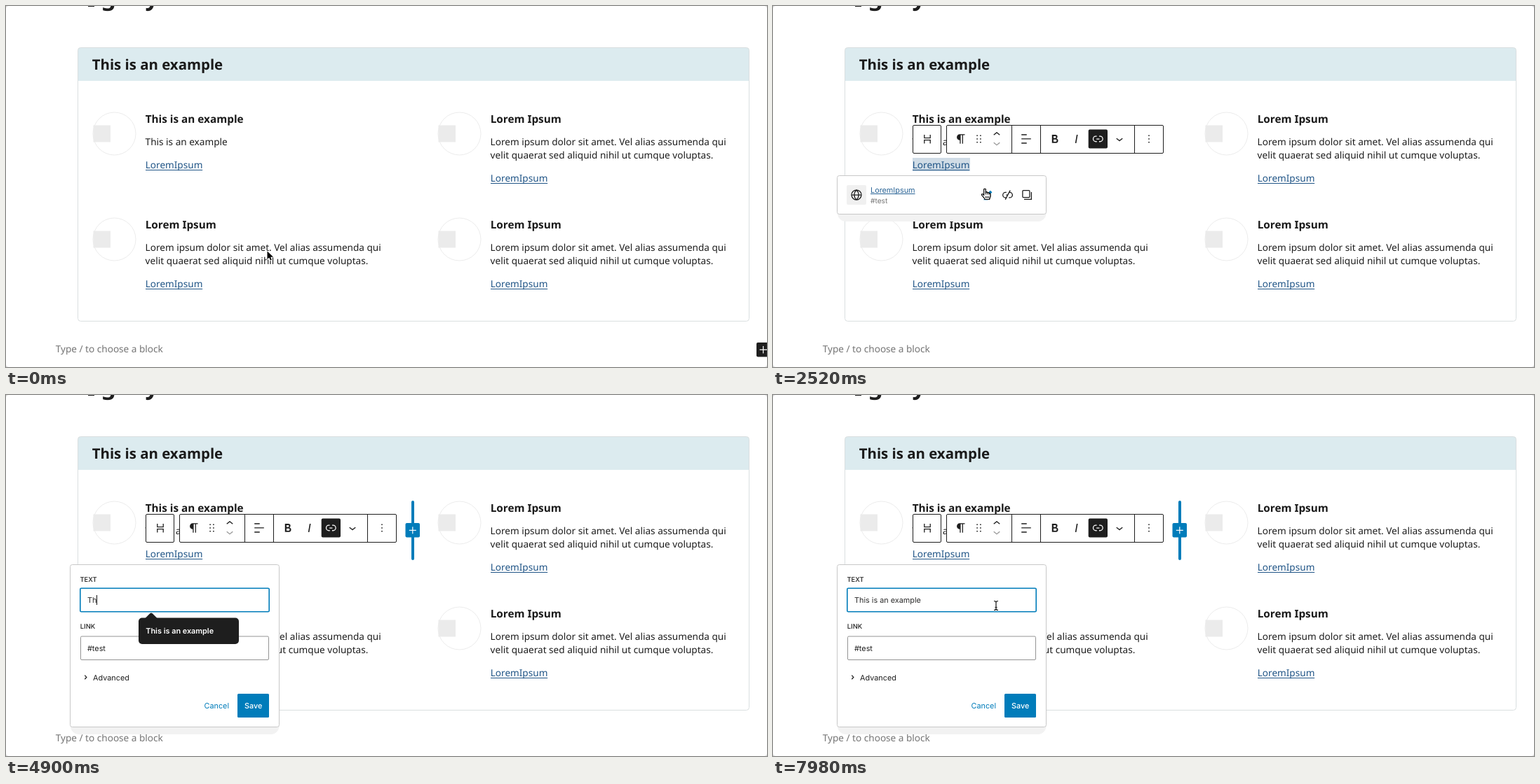
Animation, 1085 px wide and 516 px high, one loop 8 s. Source, as an HTML page with a canvas:

```html
<!DOCTYPE html>
<html lang="en">
<head>
<meta charset="utf-8">
<title>Editing a link</title>
<style>
html, body { margin: 0; width: 100%; height: 100%; overflow: hidden; background: #fff; }
canvas { display: block; }
</style>
</head>
<body>
<canvas id="stage" width="1085" height="516"></canvas>
<script>
const ctx = document.getElementById('stage').getContext('2d');
ctx.textRendering = 'geometricPrecision';
const LOOP = 8000, STEP = 70;
const INK = '#1e1e1e', BLUE = '#007cba', LINK = '#1f5486';
const BODY = '"Noto Sans", sans-serif', UI = 'Inter, sans-serif';
const PHRASE = 'This is an example';
const KEYS = [4620, 4900, 4970, 5180, 5250, 5460, 5530, 5670, 5810,
  5950, 6090, 6510, 6720, 6930, 7000, 7140, 7210, 7350];

// 24-unit icon outlines
const ICON = {
  link: 'M10 17.4H8.44A5.19 5.19 0 1 1 8.44 7H10v1.5H8.44a3.7 3.7 0 0 0 0 7.4H10zM14 7h1.56a5.19 5.19 0 0 1 0 10.4H14v-1.5h1.56a3.7 3.7 0 0 0 0-7.4H14zm-4.5 6h5v-1.5h-5z',
  unlink: 'M17.03 4.7 15.58 4l-1.56 3H14v.03L11.68 11.5H9.5V13h1.4l-1.5 2.89h-.95a3.69 3.69 0 0 1 0-7.39H10V7H8.44a5.19 5.19 0 1 0 0 10.39h.17L7.5 19.53l1.42.72L15.05 8.5h.5a3.69 3.69 0 0 1 0 7.39H14v1.5h1.56a5.19 5.19 0 0 0 .27-10.38z',
  down: 'M17.5 11.6 12 16l-5.5-4.4.9-1.2L12 14l4.5-3.6z',
  up: 'M6.5 12.4 12 8l5.5 4.4-.9 1.2L12 10l-4.5 3.6z',
  more: 'M13 19h-2v-2h2zm0-6h-2v-2h2zm0-6h-2V5h2z',
  drag: 'M8 7h2V5H8zm0 6h2v-2H8zm0 6h2v-2H8zm6-14v2h2V5zm0 8h2v-2h-2zm0 6h2v-2h-2z',
  align: 'M4 19.8h8.9v-1.5H4zM12.9 4.2H4v1.5h8.9zM4 11.2v1.5h16v-1.5z',
  bold: 'M14.7 11.3c1-.6 1.5-1.6 1.5-3 0-2.3-1.3-3.4-4-3.4H7v14h5.8c1.4 0 2.5-.3 3.3-1 .8-.7 1.2-1.7 1.2-2.9.1-1.9-.8-3.1-2.6-3.7zm-5.1-4h2.3c.6 0 1.1.1 1.4.4.3.3.5.7.5 1.2s-.2 1-.5 1.2c-.3.3-.8.4-1.4.4H9.6zm4.6 9c-.4.3-1 .4-1.7.4H9.6v-3.9h2.9c.7 0 1.3.2 1.7.5.4.3.6.8.6 1.5s-.2 1.2-.6 1.5z',
  italic: 'M12.5 5 10 19h1.9l2.5-14z',
  pilcrow: 'M10 14v6h1.5V5.5H14V20h1.5V5.5h3V4H10a5 5 0 0 0 0 10z',
  pencil: 'm19 7-3-3-8.5 8.5-1 4 4-1zm-7 11.5H5V20h7z'
};
const ARROW = new Path2D('M0 0v11.6l2.7-2.5 1.7 4 2-.9-1.7-3.9h3.8z');
const HAND = new Path2D('M3.7 9.5V1.6a1.3 1.3 0 0 1 2.6 0V6a1.2 1.2 0 0 1 2.3-.4v.8a1.2 1.2 0 0 1 2.3 0v.8a1.1 1.1 0 0 1 2 .5v3.2c0 1.6-1.3 2.6-1.3 4.6H5.2C4.7 13 1.8 11 .6 9.2 0 8 1.5 7.2 2.4 8.2z');

// time, x, y, shape
const TRACK = [
  [0, 372.5, 350.5, 'arrow'], [420, 285, 262, 'arrow'], [630, 222, 211, 'beam'],
  [770, 224, 231, 'beam'], [1050, 224, 231, 'beam'], [1330, 330, 214, 'arrow'],
  [1540, 405, 203, 'hand'], [1680, 436, 196, 'hand'], [1820, 460, 185, 'hand'],
  [1960, 460, 185, 'hand'], [2170, 405, 215, 'arrow'], [2380, 310, 256, 'hand'],
  [2520, 302, 261, 'hand'], [2660, 302, 261, 'hand'], [2730, 302, 261, 'arrow'],
  [2940, 308, 284, 'beam'], [3430, 326, 306, 'beam'], [3640, 319.5, 300, 'beam'],
  [4620, 319.5, 300, 'none'], [7980, 318, 301, 'beam'], [8000, 318, 301, 'beam']
];

function text(s, x, y, size, color, weight = 400, family = BODY) {
  ctx.font = `${weight} ${size}px ${family}`;
  ctx.fillStyle = color;
  ctx.fillText(s, x, y);
  return ctx.measureText(s).width;
}
const ui = (s, x, y, color = INK, size = 10.85, weight = 400) => text(s, x, y, size, color, weight, UI);

function rect(x, y, w, h, color) {
  ctx.fillStyle = color;
  ctx.fillRect(x, y, w, h);
}

function box(x, y, w, h, r, fill, stroke, line = 1) {
  ctx.beginPath();
  ctx.roundRect(x, y, w, h, r);
  if (fill) { ctx.fillStyle = fill; ctx.fill(); }
  if (stroke) { ctx.strokeStyle = stroke; ctx.lineWidth = line; ctx.stroke(); }
}

function icon(name, cx, cy, color = INK, scale = 0.85) {
  ctx.save();
  ctx.translate(cx - 12 * scale, cy - 12 * scale);
  ctx.scale(scale, scale);
  ctx.fillStyle = color;
  ctx.fill(new Path2D(ICON[name]));
  ctx.restore();
}

function strokePath(d, color, width) {
  ctx.strokeStyle = color;
  ctx.lineWidth = width;
  ctx.stroke(new Path2D(d));
}

function bodyLink(x, y) {
  const w = text('LoremIpsum', x - 0.3, y, 13.6, LINK);
  rect(x, y + 2, w - 0.5, 1, LINK);
}

function cell(x, y, title, lines) {
  ctx.beginPath();
  ctx.arc(x + 30.5, y + 30.5, 30.5, 0, Math.PI * 2);
  ctx.strokeStyle = '#ececec';
  ctx.lineWidth = 1;
  ctx.stroke();
  rect(x + 0.5, y + 18.5, 24.5, 24, '#ebebeb');
  const tx = x + 75;
  text(title, tx - 0.3, y + 15, 15.3, '#1a1a1a', 700);
  lines.forEach((s, i) => text(s, tx - 0.4, y + 47 + i * 19, 13.6, INK));
  bodyLink(tx, y + 61 + lines.length * 19);
}

function page(t) {
  rect(0, 0, 1085, 516, '#d8d8d8');
  box(0, 0, 1085, 516, 4, '#fff');
  text('g', 135.5, -1, 34, INK, 700);
  text('y', 198.5, -1, 34, INK, 700);
  rect(117, 0, 9, 1, INK);

  box(102.5, 59.5, 957, 391, 4, '#fff');
  box(102.5, 59.5, 957, 47.5, [4, 4, 0, 0], '#dcebef');
  box(102.5, 59.5, 957, 391, 4, null, '#dadfe0');
  text(PHRASE, 122.7, 91, 20.4, '#1a1a1a', 700);

  if (t >= 910 && t < 2730) rect(199, 217, 82, 19, '#d0dce6');
  const lorem = ['Lorem ipsum dolor sit amet. Vel alias assumenda qui',
    'velit quaerat sed aliquid nihil ut cumque voluptas.'];
  cell(124, 152, PHRASE, [PHRASE]);
  cell(616, 152, 'Lorem Ipsum', lorem);
  cell(124, 303, 'Lorem Ipsum', lorem);
  cell(616, 303, 'Lorem Ipsum', lorem);
  if (t >= 910 && t < 2520 && (t < 1480 || t >= 2030)) rect(220, 217, 1, 19, INK);

  text('Type / to choose a block', 70.7, 495, 13.6, '#757575');
  if (t < 910) {
    box(1070, 481, 21, 20.5, 2, INK);
    rect(1074.5, 490.7, 10.5, 1.2, '#fff');
    rect(1079, 486, 1.2, 10.5, '#fff');
  }
}

function toolbar(t) {
  box(199.5, 170.5, 40, 40, 1.5, '#fff', INK);
  box(247.5, 170.5, 309, 40, 1.5, '#fff', INK);
  for (const x of [340, 381, 515]) rect(x, 170, 1, 40, INK);
  strokePath('M215.8 184v4.6h8.4V184M215.8 196.4v-4.8h8.4v4.8', INK, 1.3);
  icon('pilcrow', 268, 190);
  icon('drag', 293.5, 190, INK, 0.8);
  icon('up', 319, 183.5);
  icon('down', 319, 196.2, '#949494');
  icon('align', 361, 190);
  icon('bold', 402, 190);
  icon('italic', 432.5, 190);
  const h = t < 1050 ? 8 : 27;
  box(449.7, 190 - h / 2, 27.3, h, t < 1050 ? 1 : 2, INK);
  icon('link', 463.3, 189.8, '#fff');
  icon('down', 494, 190);
  icon('more', 536, 190, INK, 0.8);
}

function panel(height) {
  box(92, 242 + height - 30, 297.5, 41, 12, '#f2f2f2');
  box(91.5, 242.5, 298, height, 3, '#fff', '#c8c8c8');
}

function preview(t) {
  ctx.globalAlpha = t < 1120 ? 0.5 : 1;
  panel(55);
  box(105, 256, 28, 28, 2, '#f0f0f0');
  strokePath('M112 270a7 7 0 1 0 14 0a7 7 0 1 0-14 0h14M119 263c-4.2 4-4.2 10 0 14c4.2-4 4.2-10 0-14', INK, 1.25);
  const w = ui('LoremIpsum', 139, 267, '#2a6496');
  rect(139, 268, w, 1, '#2a6496');
  ui('#test', 139, 282, '#757575', 10.2);
  icon('pencil', 306.5, 270.5, t >= 2380 ? BLUE : INK);
  icon('unlink', 334.5, 270);
  box(355.9, 263.6, 10, 10, 1, null, INK, 1.3);
  strokePath('M368.4 266v10.4H358', INK, 1.3);
  ctx.globalAlpha = 1;
}

function inserter() {
  box(578, 151, 4, 85, 2, BLUE);
  box(569.5, 183, 20.5, 20.5, 2, BLUE);
  rect(574.8, 192.8, 10, 1.2, '#fff');
  rect(579.2, 188.4, 1.2, 10, '#fff');
}

function form(t) {
  panel(232);
  ui('TEXT', 105.5, 266.5, INK, 9.35, 500);
  box(105.8, 276.3, 269.4, 33.4, 1.5, '#fff', BLUE, 1.6);
  const typed = KEYS.filter(k => k <= t).length;
  if (t >= 3570 && !typed) rect(116, 286, 64, 14, '#b0d2f8');
  const w = ui(typed ? PHRASE.slice(0, typed) : 'LoremIpsum', 116, 297, '#2c2c2c');
  if (typed && t < 7840) rect(Math.round(116 + w), 286, 1, 14, '#111');

  ui('LINK', 105.8, 334.4, INK, 9.35, 500);
  box(106.5, 345, 268, 33.5, 1.5, '#fff', '#949494');
  ui('#test', 116, 366);
  strokePath('M112.3 400.6l2.5 2.8-2.5 2.8', INK, 1.3);
  ui('Advanced', 124, 407.5);
  ui('Cancel', 282.5, 448, BLUE);
  box(330, 427, 45, 34, 1.5, BLUE);
  ui('Save', 340, 448, t < 4690 ? 'rgba(255,255,255,.4)' : '#fff', 10.85, t < 4690 ? 400 : 500);

  if (t >= 4900 && t < 7350) {
    box(189, 318.5, 143, 37.5, 5, INK);
    ctx.fill(new Path2D('M198.5 319l7-7q1.5-1.2 3 0l7 7z'));
    ui(PHRASE, 199.3, 341, '#fff', 10.85, 600);
  }
}

function pointer(t) {
  const i = Math.max(0, TRACK.findIndex(k => k[0] > t) - 1);
  const [t0, x0, y0, shape] = TRACK[i], [t1, x1, y1] = TRACK[i + 1];
  if (shape === 'none') return;
  const p = (t - t0) / (t1 - t0);
  ctx.save();
  ctx.translate(x0 + (x1 - x0) * p, y0 + (y1 - y0) * p);
  ctx.lineJoin = 'round';
  if (shape === 'beam') {
    const beam = 'M-3-6.5q3 0 3 2v9q0 2-3 2M3-6.5q-3 0-3 2v9q0 2 3 2M-1.5 2.5h3';
    strokePath(beam, '#fff', 2.6);
    strokePath(beam, '#111', 1.2);
  } else {
    const hand = shape === 'hand', path = hand ? HAND : ARROW;
    if (hand) ctx.translate(-5, 0);
    ctx.fillStyle = hand ? '#fff' : '#000';
    ctx.strokeStyle = hand ? '#000' : '#fff';
    ctx.lineWidth = hand ? 1.1 : 1.6;
    ctx.stroke(path);
    ctx.fill(path);
    if (hand) {
      ctx.stroke(path);
      strokePath('M6.3 6v2.5M8.6 6.5v2M10.9 7.2v1.6M6.5 10.8v3M8.5 10.8v3M10.5 10.8v3', '#000', 0.9);
    }
  }
  ctx.restore();
}

function draw(now) {
  const t = Math.floor((now % LOOP) / STEP + 1e-6) * STEP;
  ctx.clearRect(0, 0, 1085, 516);
  page(t);
  if (t >= 980) toolbar(t);
  if (t >= 2870) inserter();
  if (t >= 2730) form(t);
  else if (t >= 1050) preview(t);
  pointer(t);
}

const start = performance.now();
function tick() {
  draw(performance.now() - start);
  requestAnimationFrame(tick);
}
tick();
</script>
</body>
</html>
```
